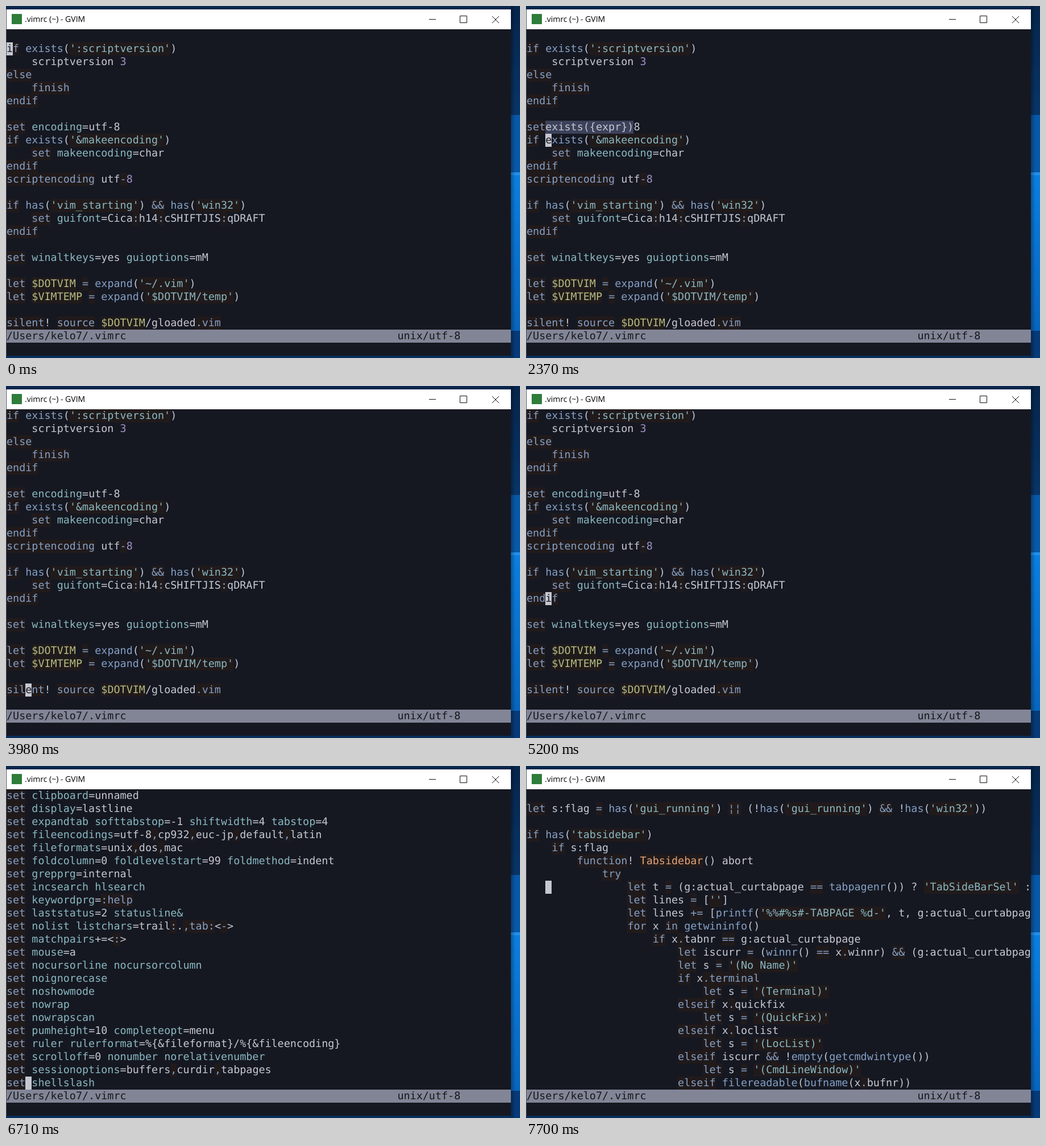
Animation of 904 by 620 pixels, one loop 8 s. Source, as an HTML page:

```html
<!DOCTYPE html>
<html lang="en">
<head>
<meta charset="utf-8">
<title>vimrc</title>
<style>
html, body { margin: 0; width: 100%; height: 100%; overflow: hidden; }
#stage { position: relative; width: 904px; height: 620px; overflow: hidden; background: #08264c; }
#stage svg { position: absolute; left: 0; top: 0; }
.title {
  position: absolute; left: 33px; top: 6px; color: #000; white-space: pre;
  font: 14px/35px "Open Sans", sans-serif; text-rendering: geometricPrecision;
}
#screen {
  position: absolute; left: 1px; top: 41px; width: 887px; height: 575px;
  overflow: hidden; background: #161821; color: #c6c8d1;
  font: 18.416px/23px "DejaVu Sans Mono", monospace;
  font-variant-ligatures: none; text-rendering: geometricPrecision;
}
#screen span { position: absolute; height: 23px; white-space: pre; }
.key, .fn, .op { color: #84a0c6; }
.str, .opt { color: #89b8c2; }
.var { color: #b4be82; }
.num { color: #a093c7; }
.def { color: #e2a478; }
.key, .op, .str, .var, .def { background: #211a1b; }
.popup { background: #3d425b; }
.cursor { background: #c6c8d1; color: #161821; width: 11px; }
.bar { position: absolute; left: 0; top: 529px; width: 887px; height: 23px; background: #818596; }
.status { color: #17171b; }
</style>
</head>
<body>
<div id="stage">
  <svg width="904" height="620">
    <defs>
      <linearGradient id="night" x2="0" y2="1">
        <stop stop-color="#06254b"/><stop offset="1" stop-color="#083568"/>
      </linearGradient>
      <linearGradient id="glow" x2="0" y2="1">
        <stop stop-color="#0b7fe0"/><stop offset="1" stop-color="#0865bd"/>
      </linearGradient>
      <linearGradient id="shade">
        <stop stop-opacity=".3"/><stop offset="1" stop-opacity="0"/>
      </linearGradient>
    </defs>
    <rect x="888" width="16" height="192" fill="url(#night)"/>
    <rect x="888" y="192" width="16" height="101" fill="#0858a8"/>
    <rect x="888" y="293" width="16" height="279" fill="url(#glow)"/>
    <rect x="888" y="293" width="16" height="5" fill="#2490ea"/>
    <rect x="888" y="572" width="16" height="48" fill="#063a78"/>
    <rect x="888" width="8" height="620" fill="url(#shade)"/>
    <rect y="616" width="888" height="4" fill="#082f5c"/>
    <rect y="6" width="1" height="611" fill="#4b5262"/>
    <rect x="1" y="6" width="887" height="35" fill="#fff"/>
    <rect x="10" y="14" width="18" height="18" fill="#2f7d3a"/>
    <path d="M744 23.5H756M798.5 17.5H810.5V29.5H798.5ZM855 18L867 30M867 18L855 30" fill="none" stroke="#111"/>
  </svg>
  <div class="title">.vimrc (~) - GVIM</div>
  <div id="screen"></div>
</div>
<script>
const LINES = String.raw`
if exists(':scriptversion')
    scriptversion 3
else
    finish
endif

set encoding=utf-8
if exists('&makeencoding')
    set makeencoding=char
endif
scriptencoding utf-8

if has('vim_starting') && has('win32')
    set guifont=Cica:h14:cSHIFTJIS:qDRAFT
endif

set winaltkeys=yes guioptions=mM

let $DOTVIM = expand('~/.vim')
let $VIMTEMP = expand('$DOTVIM/temp')

silent! source $DOTVIM/gloaded.vim

syntax on
filetype plugin indent on
set secure

set packpath=$DOTVIM

set ambiwidth=double
set autoindent
set autoread
set background=dark
set belloff=all
set cmdheight=1
set clipboard=unnamed
set display=lastline
set expandtab softtabstop=-1 shiftwidth=4 tabstop=4
set fileencodings=utf-8,cp932,euc-jp,default,latin
set fileformats=unix,dos,mac
set foldcolumn=0 foldlevelstart=99 foldmethod=indent
set grepprg=internal
set incsearch hlsearch
set keywordprg=:help
set laststatus=2 statusline&
set nolist listchars=trail:.,tab:<->
set matchpairs+=<:>
set mouse=a
set nocursorline nocursorcolumn
set noignorecase
set noshowmode
set nowrap
set nowrapscan
set pumheight=10 completeopt=menu
set ruler rulerformat=%{&fileformat}/%{&fileencoding}
set scrolloff=0 nonumber norelativenumber
set sessionoptions=buffers,curdir,tabpages
set shellslash
set showtabline=0 tabline&
set signcolumn=auto
set timeoutlen=500
set undofile undodir=$VIMTEMP
set visualbell
set wildmenu
set wildmode=longest,full

let s:flag = has('gui_running') || (!has('gui_running') && !has('win32'))

if has('tabsidebar')
    if s:flag
        function! Tabsidebar() abort
            try
                let t = (g:actual_curtabpage == tabpagenr()) ? 'TabSideBarSel' :
                let lines = ['']
                let lines += [printf('%%#%s#-TABPAGE %d-', t, g:actual_curtabpage
                for x in getwininfo()
                    if x.tabnr == g:actual_curtabpage
                        let iscurr = (winnr() == x.winnr) && (g:actual_curtabpage
                        let s = '(No Name)'
                        if x.terminal
                            let s = '(Terminal)'
                        elseif x.quickfix
                            let s = '(QuickFix)'
                        elseif x.loclist
                            let s = '(LocList)'
                        elseif iscurr && !empty(getcmdwintype())
                            let s = '(CmdLineWindow)'
                        elseif filereadable(bufname(x.bufnr))`.split('\n');

const ROWS = 23, COLS = 80, CELL = 887 / COLS, LINE = 23, LOOP = 8000;

const SET_RULE = /(?<key>^ *set\b)|(?<var>\$\w+)|(?<opt>(?<= )[a-z]+&?(?=[+= ]|$))|(?<op>[,:](?:(?:help|tab)\b)?|-(?=>))/g;
const CODE_RULE = new RegExp([
  "(?<str>'[^']*')",
  '(?<var>\\$\\w+)',
  '(?<key>\\b(?:if|else|elseif|endif|finish|let|silent|source|syntax|on|filetype|plugin|indent|scriptencoding|function|try|for|in)\\b)',
  '(?<def>Tabsidebar)',
  '(?<fn>\\w+(?=\\())',
  '(?<op>(?<= )(?:[=+]?=|&&|\\|\\|)(?= )|\\.(?:vim|terminal)?|-)',
  '(?<num>(?<= )3$|8$)'
].join('|'), 'g');

const EXISTS = 'exists({expr})', HAS = 'has({feature})';

// time, first line shown, cursor row, cursor column (-1: blinked off), popup
const STEPS = [
  [0, 0, 1, 0],
  [120, 0, 1, 3, EXISTS],
  [800, 0, 1, -1, EXISTS],
  [920, 0, 2, 3],
  [1070, 0, 3, 3],
  [1190, 0, 4, 3],
  [1470, 0, 5, 3],
  [2000, 0, 6, 0],
  [2120, 0, 7, 3],
  [2370, 0, 8, 3, EXISTS],
  [3050, 0, 8, -1, EXISTS],
  [3300, 0, 8, 3, EXISTS],
  [3580, 1, 22, 0],
  [3980, 1, 21, 3],
  [4120, 1, 20, 0],
  [4260, 1, 19, 3],
  [4530, 1, 18, 3],
  [4650, 1, 17, 0],
  [4960, 1, 16, 3],
  [5080, 1, 15, 0],
  [5200, 1, 14, 3],
  [5320, 1, 13, 3],
  [5470, 1, 12, 3, HAS],
  [6160, 1, 12, -1, HAS],
  [6440, 6, 22, 3],
  [6580, 21, 22, 3],
  [6710, 36, 22, 3],
  [6990, 51, 22, 3],
  [7110, 66, 22, 3],
  [7700, 66, 7, 3]
];

const screen = document.getElementById('screen');

function put(row, col, text, kind = '') {
  const el = document.createElement('span');
  el.className = kind;
  el.style.left = col * CELL + 'px';
  el.style.top = row * LINE + 'px';
  el.textContent = text.replaceAll('|', '¦');
  screen.append(el);
}

function putLine(row, line) {
  const text = line.slice(0, COLS);
  const indent = text.search(/\S/);
  if (indent < 0) return;
  const body = text.slice(indent);
  let at = 0;
  const plain = end => {
    if (end > at) put(row, indent + at, body.slice(at, end));
  };
  for (const m of body.matchAll(body.startsWith('set ') ? SET_RULE : CODE_RULE)) {
    plain(m.index);
    const kind = Object.keys(m.groups).find(k => m.groups[k] !== undefined);
    put(row, indent + m.index, m[0], kind);
    at = m.index + m[0].length;
  }
  plain(body.length);
}

function draw([, top, row, col, popup]) {
  screen.innerHTML = '<div class="bar"></div>';
  for (let r = 0; r < ROWS; r++) putLine(r, LINES[top + r]);
  put(ROWS, 0, '/Users/kelo7/.vimrc', 'status');
  put(ROWS, 62, 'unix/utf-8', 'status');
  if (popup) put(row - 1, 3, popup, 'popup');
  if (col >= 0) put(row, col, LINES[top + row][col] || ' ', 'cursor');
}

const start = performance.now();
let shown = null;

function tick() {
  const t = (performance.now() - start) % LOOP;
  const step = STEPS.findLast(s => s[0] <= t);
  if (step !== shown) draw(shown = step);
  requestAnimationFrame(tick);
}
tick();
</script>
</body>
</html>
```
